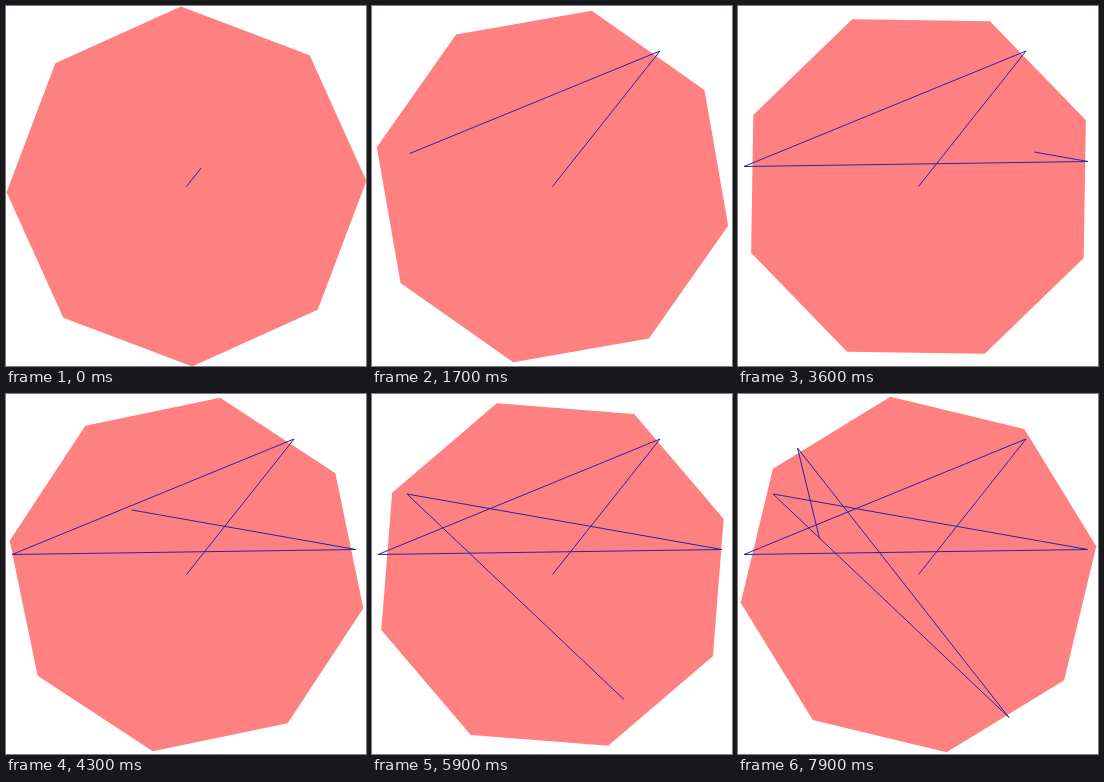
These frames come from a looping animation (360x360 px, 8000 ms). An HTML page:

```html
<!DOCTYPE html>
<html lang="en">
<head>
<meta charset="utf-8">
<title>Bouncing in a turning octagon</title>
<style>
  html, body { margin: 0; width: 100%; height: 100%; overflow: hidden; background: #fff; }
  svg { display: block; width: 100vw; height: 100vh; }
</style>
</head>
<body>
<svg viewBox="0 0 360 360">
  <polygon id="wall" fill="#ff8080"/>
  <polyline id="trail" fill="none" stroke="#2626a2" stroke-width="1"/>
</svg>
<script>
const STEP = 100, STEPS = 80, CENTER = 180.5, RADIUS = 180, TURN = Math.PI / 100;
const wall = document.getElementById('wall');
const trail = document.getElementById('trail');

// Bounces as [step, x, y]; the speed is constant between two of them.
const bounces = [
  [0, 180.5, 180.5], [7.28, 288, 45], [19.36, 6, 160.5], [34.8, 350, 155.5],
  [47.73, 35, 100], [61.07, 271, 323.5], [76.47, 59.5, 54], [80, 81.5, 144.5]
];

function octagon(step) {
  return Array.from({ length: 8 }, (_, i) => {
    const a = i * Math.PI / 4 - step * TURN;
    return [CENTER + RADIUS * Math.sin(a), CENTER - RADIUS * Math.cos(a)];
  });
}

function path(step) {
  const next = bounces.findIndex(b => b[0] >= step);
  const [t0, x0, y0] = bounces[next - 1];
  const [t1, x1, y1] = bounces[next];
  const k = (step - t0) / (t1 - t0);
  const passed = bounces.slice(0, next).map(([, x, y]) => [x, y]);
  return [...passed, [x0 + (x1 - x0) * k, y0 + (y1 - y0) * k]];
}

function draw() {
  const step = Math.floor(performance.now() / STEP) % STEPS + 1;
  wall.setAttribute('points', octagon(step).join(' '));
  trail.setAttribute('points', path(step).join(' '));
  requestAnimationFrame(draw);
}
draw();
</script>
</body>
</html>
```
